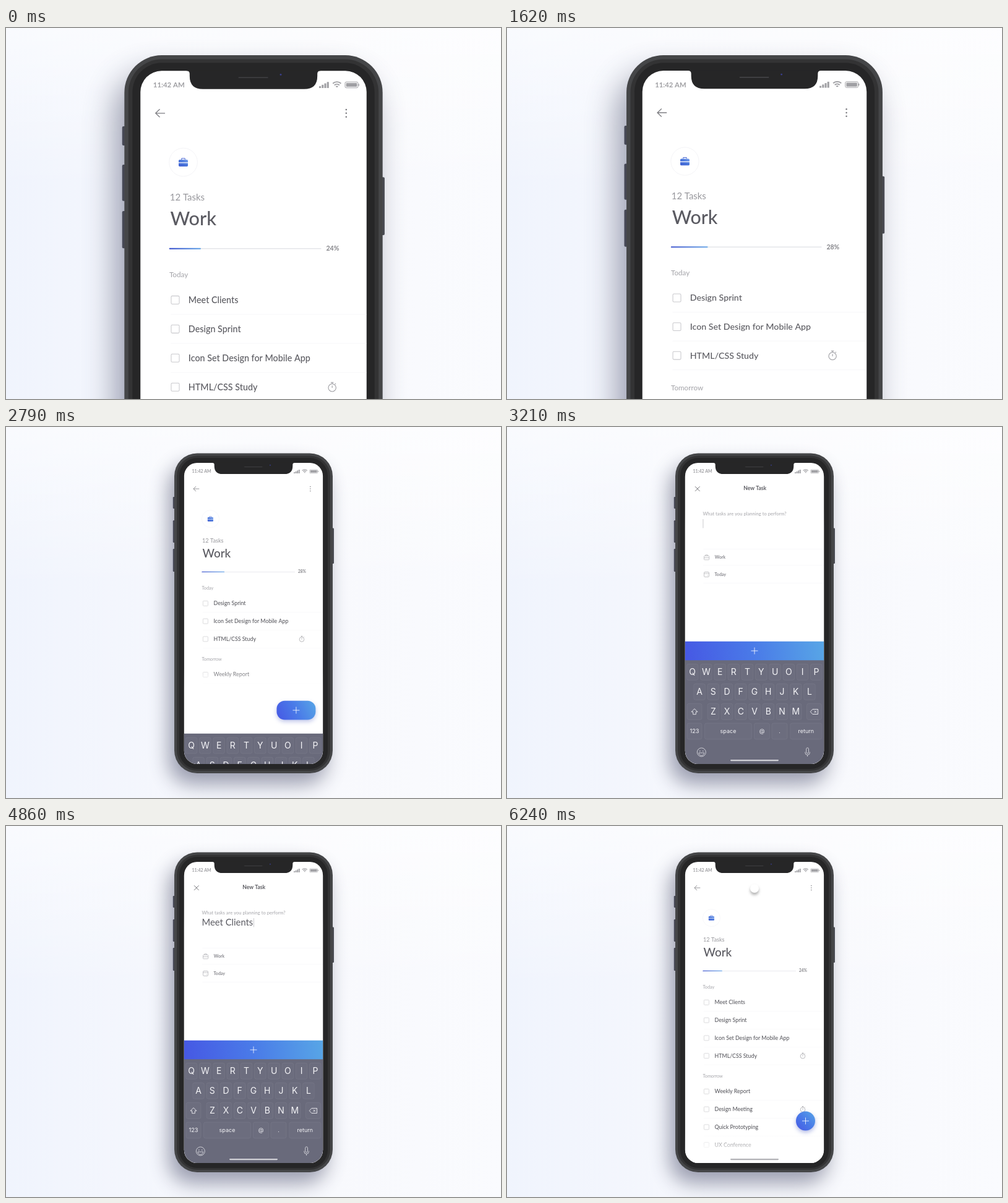
Animation, 800 px wide and 600 px high, one loop 6.27 s. Source, as an HTML page with a canvas:

```html
<!DOCTYPE html>
<html lang="en">
<head>
<meta charset="utf-8">
<title>To-do app</title>
<style>
html, body { margin: 0; width: 100%; height: 100%; overflow: hidden; background: #f7f9fe; }
canvas { display: block; }
</style>
</head>
<body>
<canvas id="stage" width="800" height="600"></canvas>
<script>
const c = document.getElementById('stage').getContext('2d');
const LOOP = 6270, ROW = 28.8, GREY = '#a0a0a4';
const SANS = 'Lato, "Open Sans", sans-serif', KEYS = 'Inter, Roboto, sans-serif';
const TASK = 'Meet Clients';

// Eased 0..1 progress of time t between a and b
function ease(t, a, b) {
  const x = Math.min(1, Math.max(0, (t - a) / (b - a)));
  return x < .5 ? 4 * x ** 3 : 1 - 4 * (1 - x) ** 3;
}

function text(s, x, y, size, color, weight = 400, align = 'left', family = SANS) {
  c.font = `${weight} ${size}px ${family}`;
  c.textAlign = align;
  c.fillStyle = color;
  c.fillText(s, x, y + size * .34);
}

function box(x, y, w, h, r, fill, stroke, width = .7) {
  c.beginPath();
  c.roundRect(x, y, w, h, r);
  if (fill) { c.fillStyle = fill; c.fill(); }
  if (stroke) { c.strokeStyle = stroke; c.lineWidth = width; c.stroke(); }
}

function path(d, x, y, stroke, width = .8) {
  c.save();
  c.translate(x, y);
  c.strokeStyle = stroke;
  c.lineWidth = width;
  c.stroke(new Path2D(d));
  c.restore();
}

function dot(x, y, r, fill) {
  c.beginPath();
  c.arc(x, y, r, 0, 7);
  c.fillStyle = fill;
  c.fill();
}

function fade(alpha, draw) {
  if (alpha <= 0) return;
  c.save();
  c.globalAlpha *= alpha;
  draw();
  c.restore();
}

function gradient(x0, y0, x1, y1, ...colors) {
  const g = c.createLinearGradient(x0, y0, x1, y1);
  colors.forEach((color, i) => g.addColorStop(i / (colors.length - 1), color));
  return g;
}

function shadow(color, blur, dx, dy, scale) {
  c.shadowColor = color;
  c.shadowBlur = blur * scale;
  c.shadowOffsetX = dx * scale;
  c.shadowOffsetY = dy * scale;
}

function background() {
  c.fillStyle = gradient(0, 0, 800, 0, '#f0f4fd', '#f5f7fd', '#f8f9fd', '#fafbfe');
  c.fillRect(0, 0, 800, 600);
  c.fillStyle = gradient(0, 0, 0, 260, 'rgba(255,255,255,.6)', 'rgba(255,255,255,0)');
  c.fillRect(0, 0, 800, 260);
}

function phone(scale) {
  for (const [x, y, h] of [[269.8, 113, 19], [269.8, 151, 36], [269.8, 197, 37], [526, 163.5, 57.5]])
    box(x, y, 4, h, 1.2, '#4b4c50');
  c.save();
  shadow('rgba(62,66,96,.5)', 32, -9, 18, scale);
  box(272, 42.5, 256, 517.5, 37, '#454648');
  c.restore();
  box(276, 46.5, 248, 509.5, 33, '#333334');
  box(280, 50, 240, 503, 29, '#262627');
  box(287.9, 58, 224.2, 487, 21, '#fff');
}

function notch() {
  c.fillStyle = '#262627';
  c.fill(new Path2D('M333.7 57.5V58Q336.7 58 336.7 61V63Q336.7 76.1 349.8 76.1H450.2Q463.3 76.1 463.3 63V61Q463.3 58 466.3 58V57.5Z'));
  box(385, 64.2, 29.5, .8, .4, '#47474a');
  dot(427, 61.7, .9, '#3a3f8c');
}

function statusBar() {
  text('11:42 AM', 300.5, 72, 7, GREY, 700);
  c.fillStyle = GREY;
  for (let i = 0; i < 4; i++) c.fillRect(465 + i * 2.6, 73.2 - i * 1.4, 1.9, 1.8 + i * 1.4);
  for (const r of [1.3, 3.6, 5.9]) {
    c.beginPath();
    c.arc(482.7, 74.8, r, Math.PI * 1.26, Math.PI * 1.74);
    c.strokeStyle = GREY;
    c.lineWidth = 1.2;
    c.stroke();
  }
  box(490.8, 69, 12.8, 5.8, 1.2, null, GREY, .6);
  box(491.8, 70, 10.8, 3.8, .6, GREY);
  box(504, 70.8, .8, 2.2, .4, GREY);
}

function briefcase(x, y, color) {
  path('M-1.7-2.6V-3.9H1.7V-2.6', x, y, color, .6);
  box(x - 4.6, y - 2.6, 9.2, 2.6, [1, 1, 0, 0], color);
  box(x - 4.6, y + .8, 9.2, 3.3, [0, 0, 1, 1], color);
}

function row(label, y, timer, done = 0, strike = 0, trash = 0) {
  c.fillStyle = '#f7f7f9';
  c.fillRect(318, y + 14, 194, .6);
  box(318.4, y - 4, 8, 8, 1, '#fff', '#c9c9cd', .65);
  fade(done, () => {
    box(318.2, y - 4.2, 8.4, 8.4, 1, '#c3c3c8');
    path('M-2 0L-.5 1.6L2.2-1.6', 322.4, y, '#fff', .9);
  });
  fade(1 - done, () => text(label, 335.5, y, 8.8, '#5b5b61', 500));
  fade(done, () => text(label, 335.5, y, 8.8, '#bcbcc1', 500));
  if (strike) {
    c.fillStyle = '#a9a9ae';
    c.fillRect(335.5, y - .1, 49 * strike, .8);
  }
  fade(trash, () => path('M-4-3H4M-1.4-3V-4.4H1.4V-3M-3-3V4.6H3V-3M-1.1-1.2V3M1.1-1.2V3', 477.8, y, '#b4b4b9', .7));
  if (timer) path('M3.8.6A3.8 3.8 0 1 1-3.8.6A3.8 3.8 0 1 1 3.8.6M0 .8V-1.5M-1.4-4.6H1.4M0-4.6V-3.2M2.8-2.8L3.6-3.6', 478, y, '#98989d', .65);
}

function listPage(t, k) {
  path('M4.8 0H-4.6M-.4-4L-4.6 0L-.4 4', 307.5, 100, '#7e7e83', .8);
  for (const d of [-3.6, 0, 3.6]) dot(491.9, 100 + d, .75, '#77777c');

  c.beginPath();
  c.arc(330.4, 148.6, 14, 0, 7);
  c.strokeStyle = '#f3f3f6';
  c.lineWidth = .6;
  c.stroke();
  briefcase(330.4, 148.7, gradient(327, 153, 333, 144, '#4060d2', '#4a78dc', '#7fa6ee'));
  text('12 Tasks', 317, 183.5, 9.2, '#98989d');
  text('Work', 317.5, 205, 18.8, '#5b5b62', 500);

  const pct = 24 + 12 * ease(t, 300, 720) - 8 * ease(t, 1250, 1700) - 4 * ease(t, 5500, 6000);
  box(316.4, 233.9, 150.8, .9, .4, '#e4e5ea');
  const fill = 1.31 * pct;
  box(316.4, 233.7, fill, 1.3, .5, gradient(316, 0, 316 + fill, 0, '#4459cf', '#6ea9e8'));
  text(Math.round(pct) + '%', 472, 234.2, 6.5, '#85858a', 700);

  text('Today', 316.5, 260.3, 7.2, '#a3a3a8');
  const shown = 1 - ease(t, 1200, 1500) + ease(t, 5500, 5900);
  const old = t < 3000 ? 1 : 0;
  fade(1 - ease(t, 1050, 1300) + ease(t, 5650, 5950), () =>
    row(TASK, 285.3, false, old * ease(t, 230, 350), old * ease(t, 300, 550), old * ease(t, 580, 720)));
  let y = 285.3 + ROW * shown;
  for (const label of ['Design Sprint', 'Icon Set Design for Mobile App', 'HTML/CSS Study']) {
    row(label, y, label.startsWith('HTML'));
    y += ROW;
  }
  text('Tomorrow', 316.5, y + 3.8, 7.2, '#a3a3a8');
  y += ROW;
  for (const label of ['Weekly Report', 'Design Meeting', 'Quick Prototyping', 'UX Conference']) {
    row(label, y, label === 'Design Meeting');
    y += ROW;
  }

  const end = 530 - 365 * k;
  c.fillStyle = gradient(0, end - 33, 0, end, 'rgba(255,255,255,0)', '#fff');
  c.fillRect(287, end - 33, 226, 579 - end);
  box(361, 538, 78, 2.2, 1.1, '#b2b2b6');
}

function newTaskPage(t) {
  c.fillStyle = '#fff';
  c.fillRect(287, 80, 226, 466);
  path('M-3.8-3.8L3.8 3.8M3.8-3.8L-3.8 3.8', 307.8, 100, '#66666b', .9);
  text('New Task', 400.7, 99.3, 8.6, '#5d5d63', 700, 'center');
  text('What tasks are you planning to perform?', 316.5, 140.5, 7.6, '#a6a6ab');

  const typed = Math.min(TASK.length, Math.max(0, Math.floor((t - 4140) / 57) + 1));
  const value = TASK.slice(0, typed);
  text(value, 316.5, 156, 14.8, '#5b5b62');
  if (typed || (t - 3280) % 600 < 350) {
    c.fillStyle = '#b5b5bb';
    c.fillRect(316.6 + (typed ? c.measureText(value).width + .6 : 0), 149, .7, 14.5);
  }

  c.fillStyle = '#f5f5f8';
  for (const y of [197, 223.5, 252]) c.fillRect(317, y, 195, .6);
  box(318.5, 208.4, 8.2, 6.4, 1, null, '#adadb2');
  path('M-1.7-2.4V-4.2H1.7V-2.4M-4 .4H4', 322.6, 211, '#adadb2', .7);
  text('Work', 335.8, 210.8, 7, '#88888e', 700);
  box(318.5, 234.5, 8, 8, 1.5, null, '#adadb2');
  path('M-4-1.6H4M1 1.6H2.4', 322.5, 238.5, '#adadb2', .7);
  text('Today', 335.5, 238.3, 7, '#88888e', 700);
}

function key(x, y, w, label, size = 14) {
  box(x - w / 2, y - 13, w, 26, 3, 'rgba(255,255,255,.02)', 'rgba(255,255,255,.1)', .6);
  if (label) text(label, x, y, size, '#f4f4f7', 400, 'center', KEYS);
}

function keyboard() {
  c.fillStyle = '#696a7b';
  c.fillRect(287, 377, 226, 170);
  [['QWERTYUOIP', 299.6], ['ASDFGHJKL', 311], ['ZXCVBNM', 333.3]].forEach(([letters, x], i) => {
    [...letters].forEach((ch, j) => key(x + j * 22.25, 396.3 + i * 32, 18.5, ch));
  });
  key(303, 460.3, 24, '');
  path('M0-4.8L5 .2H2.3V4.2H-2.3V.2H-5Z', 303, 460.5, '#f0f0f4', .9);
  key(496.5, 460.3, 24, '');
  path('M-6.2 0L-2.6-4H6V4H-2.6ZM0-1.8L3.6 1.8M3.6-1.8L0 1.8', 496.5, 460.5, '#f0f0f4', .9);
  key(303, 492, 24, '123', 9.3);
  key(357.5, 492, 76, 'space', 9);
  key(412, 492, 25, '@', 9);
  key(440.5, 492, 25, '.', 9);
  key(483.3, 492, 51, 'return', 9);
  path('M7 0A7 7 0 1 1-7 0A7 7 0 1 1 7 0M-4.4 1H4.4A4.4 4.4 0 0 1-4.4 1M-2.5-3V-1M2.5-3V-1', 314.3, 526, '#d6d6dd', .9);
  box(483.7, 518.8, 3.8, 9, 1.9, null, '#d6d6dd', .9);
  path('M-3.8-.5V.5A3.8 3.8 0 0 0 3.8.5V-.5M0 4.3V7', 485.6, 526, '#d6d6dd', .9);
  box(361, 538, 78, 2.2, 1.1, '#d0d0d6');
}

function addButton(k, scale) {
  const p = k ** 1.47, mix = (a, b) => a + (b - a) * p;
  const w = mix(31, 225), h = mix(31, 30.5), x = mix(482.5, 400), y = mix(477, 362);
  c.save();
  shadow(`rgba(60,80,190,${.4 * (1 - p)})`, 7, 0, 3, scale);
  box(x - w / 2, y - h / 2, w, h, 15.5 * (1 - p),
    gradient(x - w / 2, y + h / 2, x + w / 2, y - h / 2, '#4658e4', '#4a7be8', '#58a6e6'));
  c.restore();
  path('M-5.5 0H5.5M0-5.5V5.5', x, y, 'rgba(255,255,255,.8)', 1);
}

function draw(t) {
  const scale = 1 + .667 * (ease(t, -630, 200) - ease(t, 1400, 2230));
  const k = ease(t, 2540, 3140) - ease(t, 5000, 5600);
  background();
  c.save();
  c.translate(400, 40);
  c.scale(scale, scale);
  c.translate(-400, -40);
  phone(scale);

  c.save();
  c.beginPath();
  c.roundRect(287.9, 58, 224.2, 487, 21);
  c.clip();
  listPage(t, k);
  fade(ease(t, 2900, 3250) - ease(t, 5000, 5350), () => newTaskPage(t));
  if (k > 0) {
    c.save();
    c.translate(0, 168 * (1 - k));
    keyboard();
    c.restore();
  }
  addButton(k, scale);
  statusBar();
  fade(ease(t, 6100, 6230), () => {
    shadow('rgba(0,0,0,.3)', 4, 0, 3.5, scale);
    dot(400, 101, 7, '#fff');
  });
  c.restore();

  notch();
  c.restore();
}

const start = performance.now();
function tick() {
  draw((performance.now() - start) % LOOP);
  requestAnimationFrame(tick);
}
tick();
</script>
</body>
</html>
```
